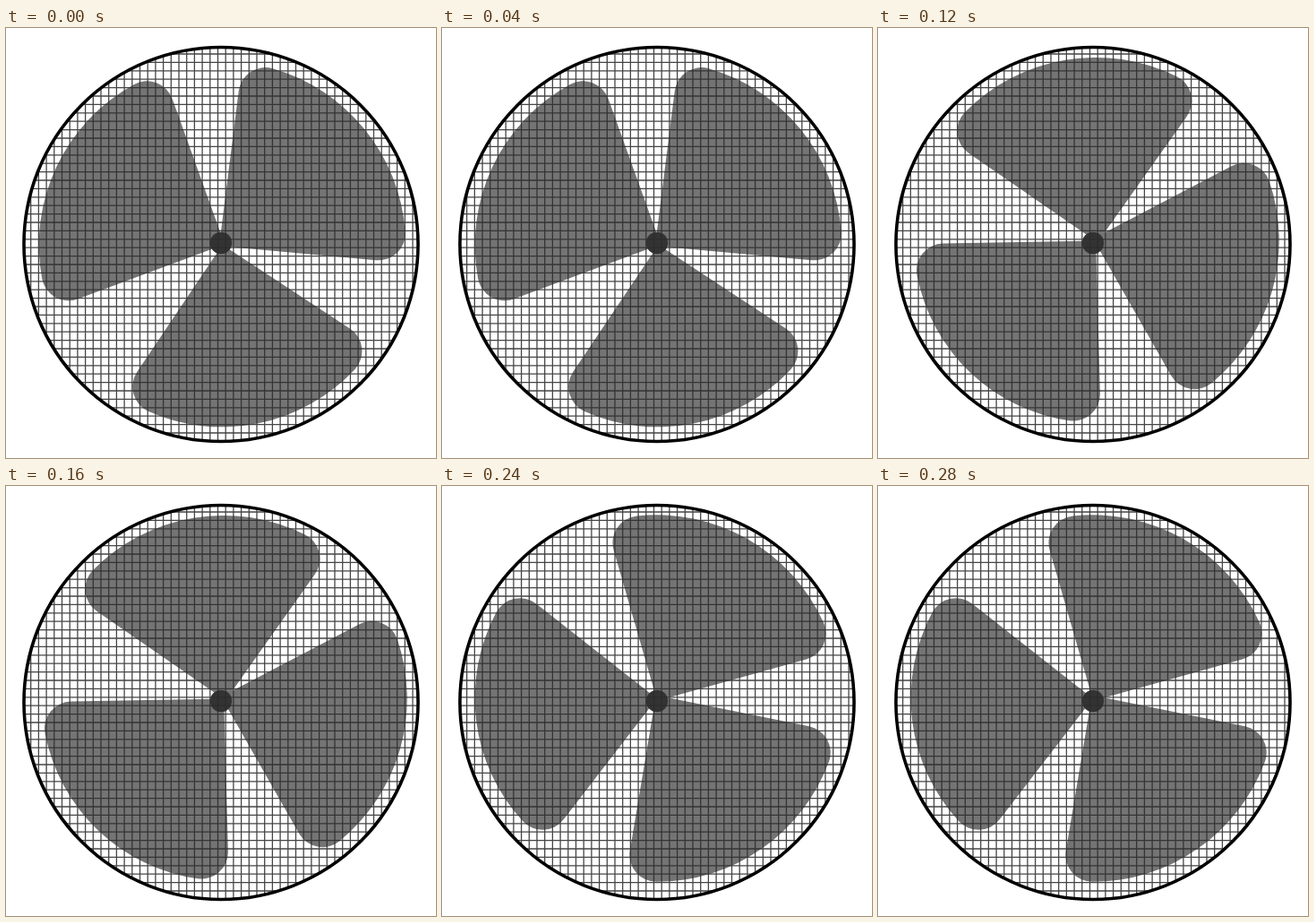
An HTML page that plays this animation: 480 by 480 pixels, repeating every 300 ms.

```html
<!DOCTYPE html>
<html lang="en">
<head>
<meta charset="utf-8">
<title>Fan</title>
<style>
html, body { margin: 0; width: 100%; height: 100%; overflow: hidden; background: #fff; }
svg { display: block; width: 100vw; height: 100vh; }
</style>
</head>
<body>
<svg viewBox="0 0 480 480">
  <defs><clipPath id="disc"><circle cx="240" cy="241.5" r="220"/></clipPath></defs>
  <path id="fan" fill="#747474"/>
  <circle cx="240" cy="240" r="12.2" fill="#333"/>
  <path id="grid" clip-path="url(#disc)" fill="none" stroke="#2c2c2c" stroke-opacity=".88" stroke-width="1.3"/>
  <circle cx="240" cy="241.5" r="220" fill="none" stroke="#000" stroke-width="3.6"/>
</svg>
<script>
const fan = document.getElementById('fan');
const STEP = 60, CORNER = 30;

// Each blade: axis angle, half spread, outer radius, tip offset from the fan's centre
const blades = [
  [-38.8, 44, 205, -3.3, 1],
  [78.6, 45.3, 203, 0.4, -0.2],
  [204.9, 45.3, 204.5, 2.9, -0.8]
];

// Each pose: rotation and the centre of the fan
const poses = [
  [0, 241.2, 242.3],
  [19.8, 241.3, 241.7],
  [55.1, 242.8, 237.4],
  [73, 240.9, 234.6],
  [94.3, 239.6, 236.8]
];

const pt = (x, y) => x.toFixed(2) + ' ' + y.toFixed(2);

// Rounded corner that touches a straight edge and the outer arc
function corner(deg, side, R, vx, vy) {
  const a = deg * Math.PI / 180;
  const ux = Math.cos(a), uy = Math.sin(a);
  const nx = -side * uy, ny = side * ux;
  const k = vx * nx + vy * ny + CORNER;
  const d = R - CORNER;
  const t = Math.sqrt(d * d - k * k);
  const cx = ux * t + nx * k, cy = uy * t + ny * k;
  return {
    edge: pt(cx - nx * CORNER, cy - ny * CORNER),
    rim: pt(cx * R / d, cy * R / d)
  };
}

function blade([axis, half, R, vx, vy]) {
  const p = corner(axis - half, 1, R, vx, vy);
  const q = corner(axis + half, -1, R, vx, vy);
  const bend = `A${CORNER} ${CORNER} 0 0 1 `;
  return `M${pt(vx, vy)}L${p.edge}${bend}${p.rim}A${R} ${R} 0 0 1 ${q.rim}${bend}${q.edge}Z`;
}

function gridPath() {
  let d = '';
  for (let x = 19; x < 462; x += 8.7) d += `M${x.toFixed(1)} 20V463`;
  for (let y = 29; y < 463; y += 9.4) d += `M18 ${y.toFixed(1)}H462`;
  return d;
}

function draw(ms) {
  const [angle, x, y] = poses[Math.floor(ms / STEP) % poses.length];
  fan.setAttribute('transform', `translate(${x} ${y}) rotate(${angle})`);
}

fan.setAttribute('d', blades.map(blade).join(''));
document.getElementById('grid').setAttribute('d', gridPath());

const start = performance.now();
function tick() {
  draw(performance.now() - start);
  requestAnimationFrame(tick);
}
tick();
</script>
</body>
</html>
```
